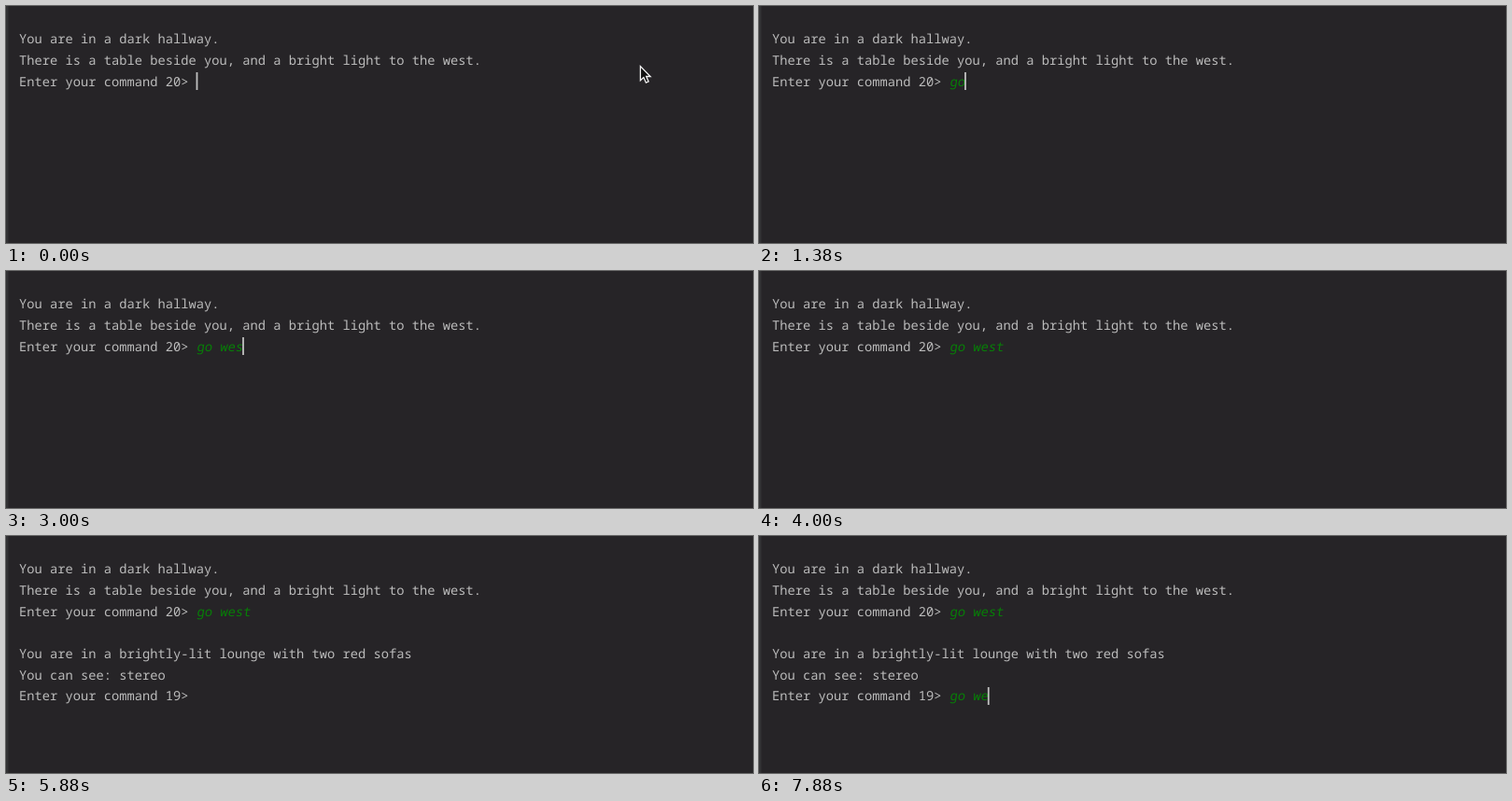
Animation, 800 px wide and 254 px high, one loop 8 s. Source, as an HTML page with a canvas:

```html
<!DOCTYPE html>
<html lang="en">
<head>
<meta charset="utf-8">
<title>Text adventure</title>
<style>
  html, body { margin: 0; height: 100%; overflow: hidden; background: #262427; }
  canvas { display: block; }
</style>
</head>
<body>
<canvas id="stage" width="800" height="254"></canvas>
<script>
const ctx = document.getElementById('stage').getContext('2d');
const LOOP = 8000;
const FONT_SIZE = 13.76;
const COLUMN = FONT_SIZE * 0.6;
const LEFT = 14.1;
const FIRST_BASELINE = 40.3;
const ROW_HEIGHT = 22.68;
const PROMPT_COLUMNS = 23;
const ENTER_TIME = 4120;

// Each track is a list of [start time, value] with hard changes.
const firstInput = [[0, ''], [1120, 'g'], [1245, 'go'], [2120, 'go '], [2495, 'go w'],
  [2745, 'go we'], [2870, 'go wes'], [3120, 'go west']];
const secondInput = [[0, ''], [6745, 'g'], [6870, 'go'], [7245, 'go '], [7745, 'go w'], [7870, 'go we']];
const caretShown = [[0, true], [495, false], [870, true], [1870, false], [2120, true],
  [3870, false], [ENTER_TIME, true], [4870, false], [5245, true], [5870, false], [6245, true]];
const pointerPlace = [[0, [679, 64]], [120, [657, 62]], [370, [622, 62]], [495, [606, 62]],
  [870, [604, 60]], [1120, null]];

const valueAt = (track, time) => track.findLast(([start]) => start <= time)[1];
const columnX = column => LEFT + column * COLUMN;
const baseline = row => FIRST_BASELINE + row * ROW_HEIGHT;

function drawText(text, row) {
  ctx.fillStyle = '#bbbbbb';
  ctx.fillText(text, LEFT, baseline(row));
}

function drawInput(text, row) {
  ctx.save();
  ctx.translate(columnX(PROMPT_COLUMNS), baseline(row));
  ctx.transform(1, 0, -0.16, 1, 0, 0);
  ctx.fillStyle = '#077f07';
  ctx.fillText(text, 0, 0);
  ctx.restore();
}

function drawCaret(text, row) {
  const x = columnX(PROMPT_COLUMNS + text.length) - 0.4;
  ctx.fillStyle = '#c0c0c0';
  ctx.fillRect(x, Math.round(baseline(row) - 14.5), 1.8, 19);
}

function drawPointer([x, y]) {
  ctx.save();
  ctx.translate(x + 0.4, y + 0.6);
  ctx.fillStyle = '#111';
  ctx.strokeStyle = '#f2f2f2';
  ctx.lineWidth = 1.3;
  const arrow = new Path2D('M0 0V15.2L3.5 12L6 17.6L8.7 16.4L6.3 10.9H10.7Z');
  ctx.fill(arrow);
  ctx.stroke(arrow);
  ctx.restore();
}

function draw(time) {
  ctx.fillStyle = '#262427';
  ctx.fillRect(0, 0, 800, 254);
  ctx.fillStyle = '#323234';
  ctx.fillRect(0, 0, 2.5, 254);

  ctx.font = `500 ${FONT_SIZE}px "Noto Sans Mono", monospace`;
  ctx.textRendering = 'geometricPrecision';

  const entered = time >= ENTER_TIME;
  const first = valueAt(firstInput, time);
  const second = valueAt(secondInput, time);

  drawText('You are in a dark hallway.', 0);
  drawText('There is a table beside you, and a bright light to the west.', 1);
  drawText('Enter your command 20>', 2);
  drawInput(first, 2);

  if (entered) {
    drawText('You are in a brightly-lit lounge with two red sofas', 4);
    drawText('You can see: stereo', 5);
    drawText('Enter your command 19>', 6);
    drawInput(second, 6);
  }

  if (valueAt(caretShown, time)) drawCaret(entered ? second : first, entered ? 6 : 2);

  const place = valueAt(pointerPlace, time);
  if (place) drawPointer(place);
}

const startTime = performance.now();
function tick() {
  draw((performance.now() - startTime) % LOOP);
  requestAnimationFrame(tick);
}
tick();
</script>
</body>
</html>
```
